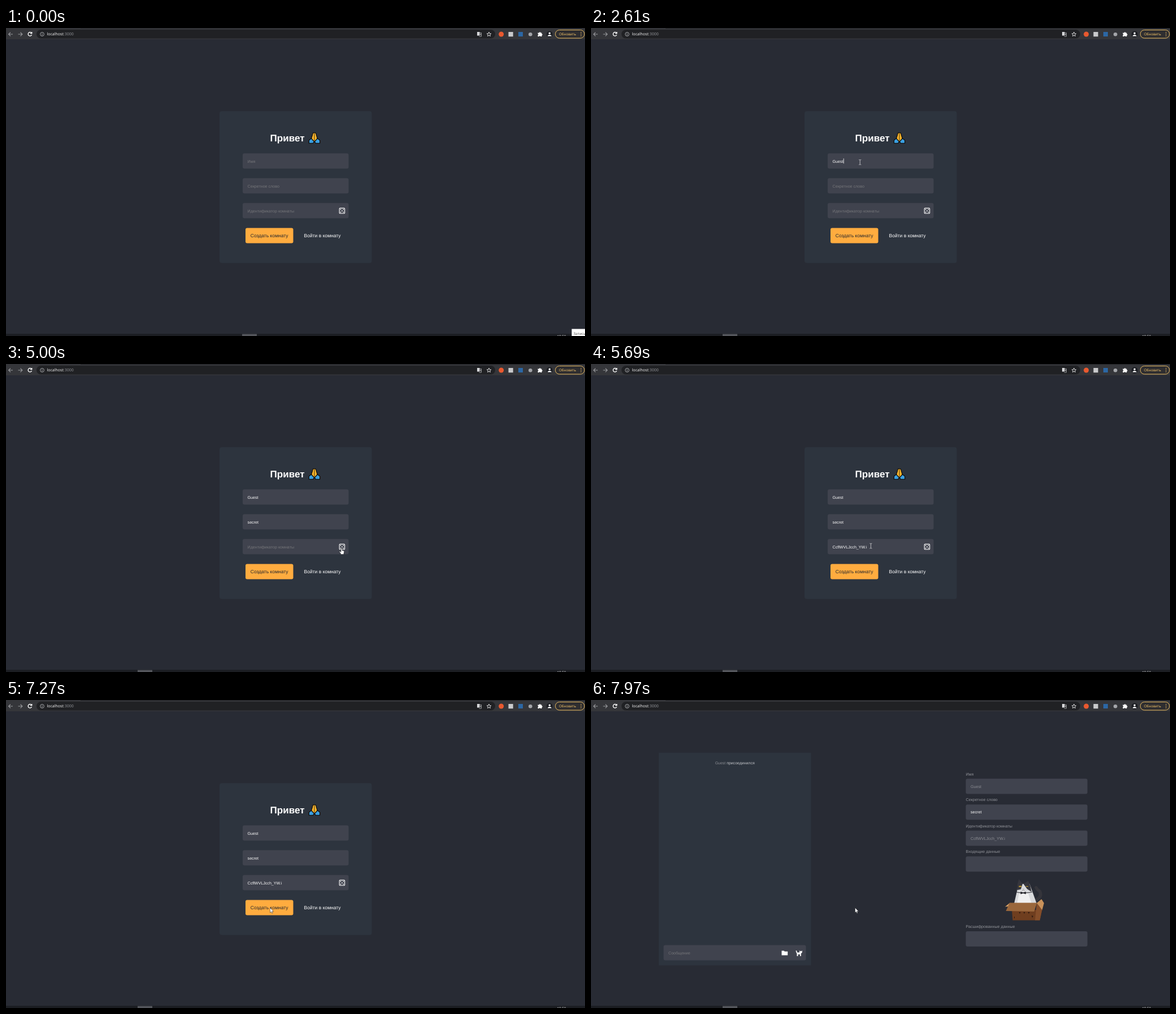
An HTML page for the animation above (8000 ms loop, 1025 px wide and 546 px high).

```html
<!DOCTYPE html>
<html lang="ru">
<head>
<meta charset="utf-8">
<title>Комната</title>
<style>
  html, body { margin: 0; width: 100%; height: 100%; overflow: hidden; background: #282b34; }
  svg { display: block; width: 100%; height: 100%; }
  text { font: 7.12px "Liberation Sans", Arial, sans-serif; fill: #fff; text-rendering: geometricPrecision; white-space: pre; }
  .ui { font: 7px "Open Sans", sans-serif; }
  .btn { font-size: 8.54px; }
  .title { font-size: 17.08px; font-weight: bold; }
  .hint { fill: #75767a; }
  .dim { fill: #8b8d93; }
  .label { fill: #909298; }
  .box { fill: #40434e; }
  .card { fill: #2d343e; }
  .line { fill: none; stroke: #fff; stroke-width: 1.1; }
</style>
</head>
<body>
<svg viewBox="0 0 1025 546" preserveAspectRatio="none">
  <rect width="1025" height="546" fill="#282b34"/>

  <g id="browser">
    <rect width="1025" height="20" fill="#35363a"/>
    <rect id="strip" x="132" width="893" height="1"/>
    <rect x="54" y="3" width="812" height="15.5" rx="7.7" fill="#202124"/>
    <path class="line" style="stroke:#9a9b9e" d="M12 11H4.8M8 7.6L4.6 11L8 14.4M21.500 11H28.700M25.500 7.600L28.900 11L25.500 14.400"/>
    <path class="line" style="stroke-width:1.300" d="M45.200 9A3.300 3.300 0 1 0 45.500 12M45.800 7V9.700H43"/>
    <circle class="line" style="stroke-width:.8;stroke:#c5c6c9" cx="64" cy="11" r="3.400"/>
    <path class="line" style="stroke-width:.8;stroke:#c5c6c9" d="M64 9V9.800M64 10.500V13"/>
    <text class="ui" x="72.500" y="13.400">localhost<tspan fill="#96989c">:3000</tspan></text>
    <rect x="834" y="7" width="4.500" height="6.500" fill="#d5d6d8"/>
    <path class="line" style="stroke-width:.7;stroke:#c5c6c9" d="M838 8.500H841.500V15H837.500M839 11H841M840 10V13"/>
    <path class="line" style="stroke-width:.8" d="M855 7.200L856 9.800L858.800 10L856.700 11.800L857.400 14.500L855 13L852.600 14.500L853.300 11.800L851.200 10L854 9.800Z"/>
    <circle cx="876.700" cy="11" r="4.500" fill="#e9592f"/>
    <rect x="889.500" y="7" width="8.200" height="8.200" fill="#c9cacc"/>
    <rect x="907" y="7" width="8" height="8" fill="#2c67a4"/>
    <circle cx="928.300" cy="11.300" r="3.300" fill="#a4a6aa"/>
    <path fill="#fff" d="M941.500 8.500H944A1.200 1.200 0 0 1 946.400 8.500H948.400V10.500A1.200 1.200 0 0 1 948.400 13V15H946A1 1 0 0 0 944 15H941.500V12.600A1 1 0 0 0 941.500 10.600Z"/>
    <circle cx="962.300" cy="11" r="5.500" fill="#1d1f24"/>
    <path fill="#fff" d="M959 14.500V13.500Q962.300 10.700 965.600 13.500V14.500Z"/>
    <circle cx="962.300" cy="9.300" r="1.700" fill="#fff"/>
    <rect x="972.500" y="3.500" width="51.500" height="14.500" rx="7.200" fill="#2f2e30" stroke="#e9bb62"/>
    <text class="ui" x="979" y="13.200" style="font-size:6.200px;fill:#fbca6b">Обновить</text>
    <path fill="#fbca6b" d="M1017.300 7.300h1.300v1.300h-1.300zM1017.300 10.300h1.300v1.300h-1.300zM1017.300 13.300h1.300v1.300h-1.300z"/>
  </g>

  <g id="form">
    <rect class="card" x="378" y="147.500" width="269.500" height="269" rx="4"/>
    <text class="title" x="467.500" y="201">Привет</text>
    <g stroke="#111" stroke-width="1.300" stroke-linejoin="round">
      <path fill="#fbb62c" d="M545.800 186C543.500 185 542.800 187 542.500 189.500L540.500 196L541 201.500L545.800 202L550.800 201.500L551.300 196L549.300 189.500C549 187 548 185 545.800 186Z"/>
      <path fill="#3ba0e2" d="M540.500 195.800L536.400 199V204.300H543.500L545.500 201.500ZM551.300 195.800L555.600 199V204.300H548.300L546.300 201.500Z"/>
      <path stroke-width=".8" d="M545.900 187V201"/>
    </g>
    <g id="fields"></g>
    <g class="line">
      <rect x="590.200" y="319.400" width="9.400" height="9.400" rx="1"/>
    </g>
    <g id="pips" fill="#fff"></g>
    <rect x="424" y="354.500" width="84.500" height="27" rx="3" fill="#ffac3f"/>
    <text class="btn" x="432.800" y="371.200" style="fill:#23262d">Создать комнату</text>
    <text class="btn" x="527.500" y="371.200">Войти в комнату</text>
    <rect id="caret" width=".8" height="9" fill="#fff"/>
  </g>

  <g id="chat">
    <rect class="card" x="120" y="93.500" width="269.500" height="377"/>
    <text id="joined" class="dim" x="219.700" y="113.500" style="font-size:6.940px">Guest<tspan fill="#c3c5c9"> присоединился</tspan></text>
    <rect class="box" x="128.500" y="434.500" width="252" height="27" rx="3"/>
    <text class="hint" x="137" y="451">Сообщение</text>
    <path fill="#fff" d="M337.500 444.500H341.500L342.800 445.700H348.200V452.500H337.500Z"/>
    <path fill="#fff" d="M362.500 444.500L364 444L365 447.500H369L369.200 444L370.500 445.200H372.500L373.800 444V447.500L371.800 449.500V454H370V451H366.500V454H364.500V449.500L363.500 448Z"/>
    <g id="info"></g>
    <g id="cat">
      <path id="tail" fill="none" stroke="#35353b" stroke-width="5.500" stroke-linecap="round"/>
      <path fill="#d9dadc" d="M757 326L749 361H789L776.500 326Z"/>
      <path fill="#f0f0f0" d="M758 343L754 361H780L774 343Z"/>
      <path fill="#36363d" d="M754.500 337L754.800 327L757.500 317.500L762 323.500L764.500 324.500L761 335.500ZM764.500 324.500L768 324.500L774 320.500L777.500 329L780 340L772 335Z"/>
      <rect id="eye" x="757.500" width="4.500" fill="#e4b429"/>
      <rect id="eye2" x="770" width="4" fill="#e4b429"/>
      <path fill="none" stroke="#8c8488" stroke-width=".7" d="M764 334.500L765.500 335.700L767 334.500M763 338Q765.500 336 768 338"/>
      <path fill="none" stroke="#2b2b31" d="M752.500 340.500Q765 343.500 781 340.500"/>
      <path fill="#1d1d22" d="M760.500 339.800L765 341.500L769.800 339.800V344.200L765 342.600L760.500 344.200Z"/>
      <path fill="#c8915a" d="M789 360L797.500 353L802 360L798.500 373Z"/>
      <path fill="#d6a066" d="M733 366.500L741 360L739 366Z"/>
      <path fill="#6f3e1f" d="M745 372H790L798.500 371.500L794.500 390.500H746.500Z"/>
      <path fill="#854e2a" d="M789 360L798.500 372L794.500 390.500H786Z"/>
      <path fill="#9a673c" d="M741 359.500H789.500L784.500 375L734.500 374Z"/>
      <path fill="#2e1a10" d="M757.500 376h3l-1.500 3zM765.500 376h3l-1.500 3zM773.500 376h3l-1.500 3zM749 384h1v3h-1zM780 382l3 1-2 3z"/>
    </g>
  </g>

  <g id="taskbar">
    <rect y="542" width="1025" height="4" fill="#1c1e23"/>
    <rect id="task" y="542.500" width="26" height="3.500" fill="#55575d"/>
    <text class="ui" x="975.500" y="549.300" style="font-size:6.200px">18:50</text>
    <g id="tip">
      <rect x="1001.500" y="533.500" width="30" height="20" fill="#fff"/>
      <text class="ui" x="1004.500" y="544" style="font-size:6.200px;fill:#4b4b4b">Запись</text>
    </g>
  </g>

  <g id="cursor">
    <path id="arrow" fill="#fff" stroke="#16181d" stroke-width=".5" d="M0 0V8.800L2 7L3.300 10L4.700 9.400L3.400 6.500H6.200Z"/>
    <path id="beam" fill="none" stroke="#c9cacd" stroke-width=".9" d="M-2 -4.300H-.5L0 -3.800L.5 -4.300H2M0 -3.800V3.800M-2 4.300H-.5L0 3.800L.5 4.300H2"/>
    <path id="hand" fill="#fff" stroke="#16181d" stroke-width=".6" d="M-1 .8Q0 -.6 1 .8V4L4 4.800Q5 5.200 4.800 6.500L4 9V11H-1.500V9.500L-4 6.300Q-3.500 4.800 -2.200 5.800L-1 6.800Z"/>
  </g>
</svg>
<script>
const $ = id => document.getElementById(id);
const show = (id, on) => $(id).style.display = on ? '' : 'none';
const set = (id, attrs) => { for (const k in attrs) $(id).setAttribute(k, attrs[k]); };

const LOOP = 8000, STEP = 70, BLINK = 530, LEFT = 427.6;
const NAME = 'Guest', SECRET = 'secret', ROOM = 'CcflWVLJcch_YW.i';
const nameKeys = [1750, 1950, 2060, 2170, 2280];
const secretKeys = [3480, 3550, 3750, 3950, 4020, 4150];
const rows = [222.3, 266.3, 310.3];

$('fields').innerHTML = ['Имя', 'Секретное слово', 'Идентификатор комнаты'].map((hint, i) => `
  <rect class="box" x="419" y="${rows[i]}" width="187.500" height="27" rx="3"/>
  ${i === 2 ? '<rect id="pick" y="319.500" height="9" fill="#1269d3"/>' : ''}
  <text class="hint" id="hint${i}" x="${LEFT}" y="${rows[i] + 16.2}">${hint}</text>
  <text id="value${i}" x="${LEFT}" y="${rows[i] + 16.2}"></text>`).join('');

$('pips').innerHTML = [[-2.4, -2.4], [2.4, -2.4], [0, 0], [-2.4, 2.4], [2.4, 2.4]]
  .map(([x, y]) => `<circle cx="${594.9 + x}" cy="${324.1 + y}" r=".95"/>`).join('');

$('info').innerHTML = [
  [139.4, 'Имя', NAME, 'dim'], [185.2, 'Секретное слово', SECRET, ''],
  [231.4, 'Идентификатор комнаты', ROOM, 'dim'], [277.2, 'Входящие данные', '', ''],
  [410, 'Расшифрованные данные', '', '']
].map(([y, label, value, cls]) => `
  <text class="label" x="663.500" y="${y - 5.9}">${label}</text>
  <rect class="box" x="663.500" y="${y}" width="215.300" height="27" rx="3"/>
  <text class="${cls}" x="672" y="${y + 16.2}">${value}</text>`).join('');

// Pointer path: time, x, y
const path = [
  [240, 986, 530], [940, 476, 235.5], [2540, 476, 235.5], [3030, 480, 279.5],
  [4160, 480, 279.5], [4720, 576, 324], [4930, 594, 326.5], [5130, 594, 326.5],
  [5550, 533, 323], [5970, 388, 321], [6180, 401, 327], [6390, 424, 347], [6810, 467.5, 368.2]
];

function pointer(t) {
  const i = path.findIndex(p => t < p[0]);
  if (i < 0) return path[path.length - 1].slice(1);
  if (!i) return path[0].slice(1);
  const [a, b] = [path[i - 1], path[i]];
  const f = Math.floor((t - a[0]) / STEP) * STEP / (b[0] - a[0]);
  const e = f * f * (3 - 2 * f);
  return [a[1] + (b[1] - a[1]) * e, a[2] + (b[2] - a[2]) * e];
}

function shape(x, y, inForm) {
  if (!inForm) return 'arrow';
  if (x > 588 && x < 601 && y > 317 && y < 331) return 'hand';
  return x > 419 && x < 606 && rows.some(r => y > r && y < r + 27) ? 'beam' : 'arrow';
}

const typed = (text, keys, t) => text.slice(0, keys.filter(k => k <= t).length);

function drawForm(t, x) {
  const values = [typed(NAME, nameKeys, t), typed(SECRET, secretKeys, t), t >= 5130 ? ROOM : ''];
  values.forEach((v, i) => {
    if ($('value' + i).textContent !== v) $('value' + i).textContent = v;
    show('hint' + i, !v);
  });

  const row = t < 3150 ? 0 : 1;
  const last = Math.max(...[1140, 3150, ...nameKeys, ...secretKeys].filter(k => k <= t));
  const lit = t >= 1140 && t < 5130 && Math.floor((t - last) / BLINK) % 2 === 0;
  show('caret', lit);
  if (lit) set('caret', { x: LEFT + .2 + $('value' + row).getComputedTextLength(), y: rows[row] + 9 });

  const picking = t >= 5620 && t < 7200;
  show('pick', picking);
  if (picking) {
    const el = $('value2'), width = el.getComputedTextLength();
    let n = 0;
    while (t < 5970 && n < ROOM.length && LEFT + el.getSubStringLength(0, n + 1) < x) n++;
    const from = n ? el.getSubStringLength(0, n) : 0;
    set('pick', { x: LEFT + from, width: Math.max(0, width - from) });
  }
}

function drawCat(t) {
  const k = Math.floor((t - 7410) / STEP);
  const sway = Math.sin(k * .7) * .8;
  set('tail', { d: `M789 354Q799 348 ${795 + sway} 339Q${790 + sway} 336 ${788.5 + sway} 332.500` });
  const open = 1.2 + .5 * Math.cos(k * .8);
  set('eye', { y: 330.5 - open / 2, height: open });
  set('eye2', { y: 331 - open / 2, height: open * .5 });
}

function draw(t) {
  const inForm = t < 7340, [x, y] = pointer(t);
  show('form', inForm);
  show('chat', !inForm);
  show('tip', t < 70);
  set('strip', { fill: t < 1140 ? '#2b2c30' : '#202124' });
  set('task', { x: t < 1140 ? 418 : 233 });
  if (inForm) drawForm(t, x);
  else {
    show('joined', t >= 7480);
    show('cat', t >= 7410);
    drawCat(t);
  }
  show('cursor', t >= 310);
  set('cursor', { transform: `translate(${x} ${y})` });
  const kind = shape(x, y, inForm);
  ['arrow', 'beam', 'hand'].forEach(id => show(id, id === kind));
}

const start = performance.now();
function tick() {
  draw((performance.now() - start) % LOOP);
  requestAnimationFrame(tick);
}
tick();
</script>
</body>
</html>
```
